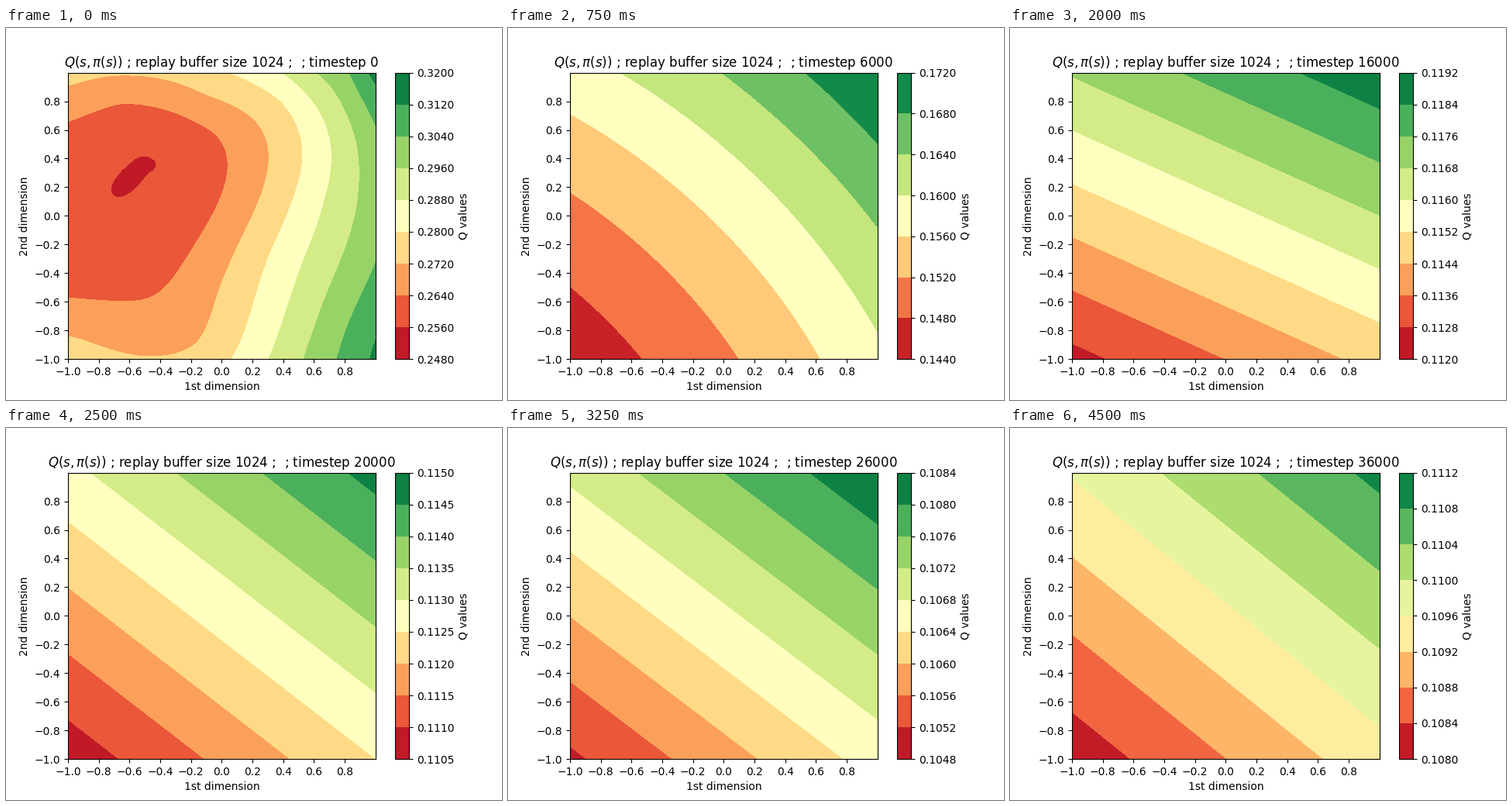
Write a matplotlib script that moves like this. It is 640x480 px and loops after 4750 ms.

```python
import numpy as np
import matplotlib.pyplot as plt
from matplotlib.animation import FuncAnimation

FRAMES, INTERVAL = 19, 250

plt.rcParams["font.family"] = "DejaVu Sans"
axis = np.linspace(-1, 1, 200)
X, Y = np.meshgrid(axis, axis)
TICKS = np.arange(-10, 10, 2) / 10


def kernel(x, y, px, py):
    r2 = (x[..., None] - px) ** 2 + (y[..., None] - py) ** 2
    return r2 * np.log(r2 + 1e-12)


def spline(lines):
    """Thin-plate spline through iso-lines {value: [(x, y), ...]} in stage pixels."""
    pts = np.array([(x, y, v) for v, line in lines.items() for x, y in line], float)
    px, py = (pts[:, 0] - 278.4) / 198.4, (242.4 - pts[:, 1]) / 184.8
    n = len(pts)
    poly = np.column_stack([np.ones(n), px, py])
    system = np.block([[kernel(px, py, px, py), poly], [poly.T, np.zeros((3, 3))]])
    w = np.linalg.solve(system, np.append(pts[:, 2], [0, 0, 0]))
    return kernel(X, Y, px, py) @ w[:n] + w[n] + w[n + 1] * X + w[n + 2] * Y


def plane(mid, dx, dy, bowl=0):
    return mid + dx * X + dy * Y + bowl * (X**2 + Y**2)


BASIN = {
    0.96: [(178, 177)],
    1: [(160, 174), (194, 175), (184, 188)],
    2: [(80, 121), (148, 98), (220, 110), (270, 137), (286, 172), (268, 238),
        (225, 309), (185, 348), (80, 348)],
    3: [(80, 74), (160, 61), (262, 87), (318, 116), (339, 160), (318, 242),
        (276, 335), (246, 406), (203, 423), (80, 398)],
    4: [(290, 58), (355, 95), (383, 163), (341, 290), (291, 427)],
    5: [(358, 58), (413, 125), (411, 222), (387, 292), (339, 427)],
    6: [(402, 58), (450, 138), (452, 235), (384, 427)],
    7: [(443, 58), (477, 126), (477, 303), (427, 427)],
    8: [(468, 58), (477, 402)],
}

# step index: Q surface, as lowest level + level spacing * height in levels
SURFACES = {
    0: 0.248 + 0.008 * spline(BASIN),
    3: 0.144 + 0.004 * plane(3.165, 1.7, 1.6, bowl=0.26),
    6: 0.114 + 0.0015 * plane(3.215, 0.789, 2.142),
    10: 0.1105 + 0.0005 * plane(4.362, 1.795, 2.165),
    13: 0.1048 + 0.0004 * plane(4.797, 1.793, 2.2),
    15: 0.1108 + 0.0004 * plane(4.398, 1.766, 2.028),
    18: 0.108 + 0.0004 * plane(3.826, 1.593, 1.84),
}


def q_values(i):
    a = max(k for k in SURFACES if k <= i)
    b = min(k for k in SURFACES if k >= i)
    t = (i - a) / max(b - a, 1)
    return (1 - t) * SURFACES[a] + t * SURFACES[b]


fig = plt.figure(figsize=(6.4, 4.8), dpi=100)


def draw(i):
    fig.clear()
    ax = fig.add_subplot()
    filled = ax.contourf(X, Y, q_values(i), cmap="RdYlGn")
    fig.colorbar(filled, ax=ax, label="Q values", ticks=filled.levels, format="%.4f")
    ax.set(xticks=TICKS, yticks=TICKS, xlim=(-1, 1), ylim=(-1, 1),
           xlabel="1st dimension", ylabel="2nd dimension")
    ax.set_title(rf"$Q(s,\pi(s))$ ; replay buffer size 1024 ;  ; timestep {2000 * i}",
                 pad=5.3)


anim = FuncAnimation(fig, draw, frames=FRAMES, interval=INTERVAL,
                     init_func=lambda: None, repeat=True, repeat_delay=0)
plt.show()
```
